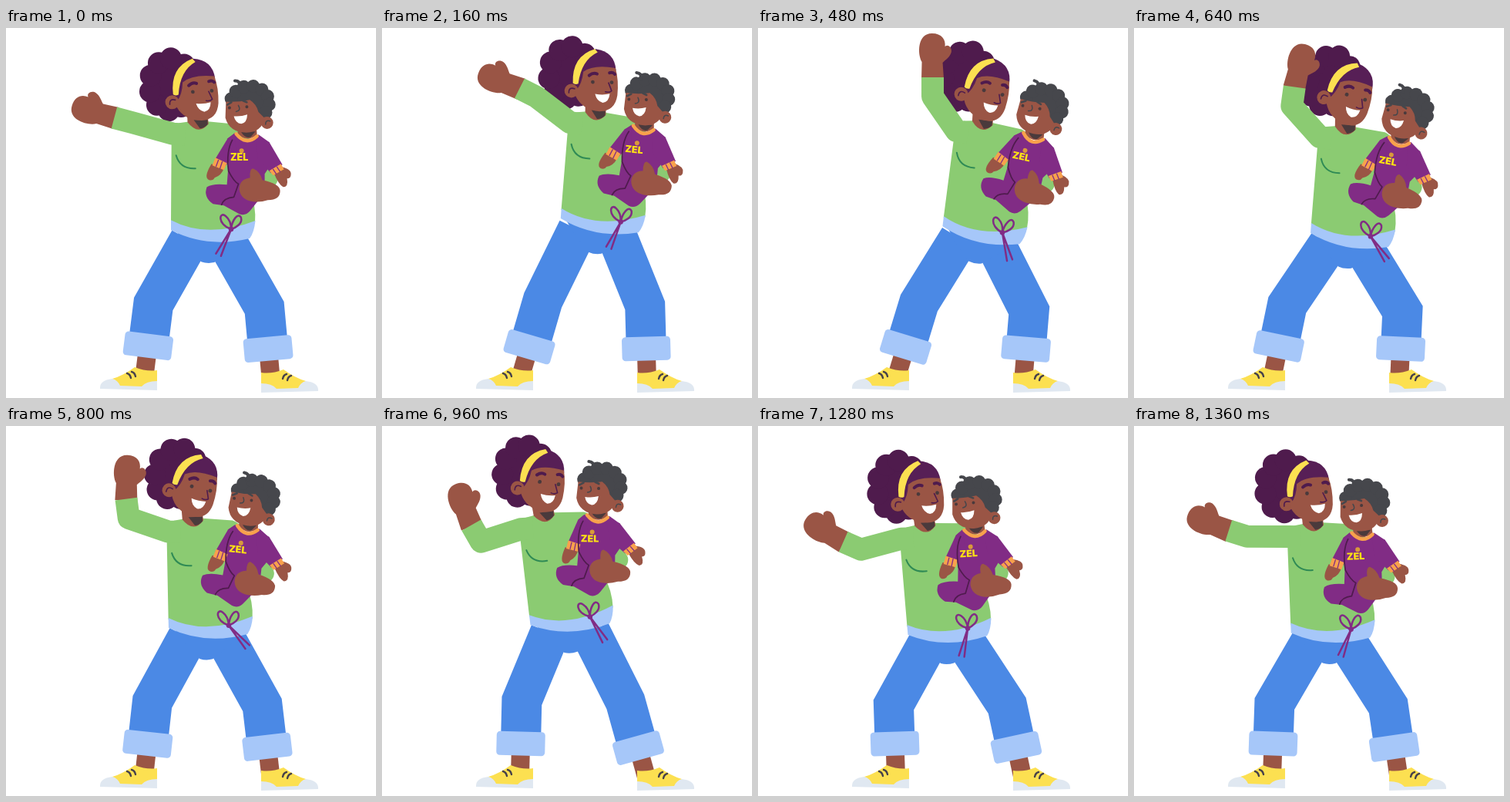
An HTML page that plays this animation: 480x480 px, repeating every 1440 ms.

```html
<!DOCTYPE html>
<html lang="en">
<head>
<meta charset="utf-8">
<title>Dancing with the baby</title>
<style>
  html, body { margin: 0; width: 100%; height: 100%; overflow: hidden; background: #fff; }
  svg { display: block; width: 100%; height: 100%; }
  .skin { fill: #9a5545; }
  .green { fill: #8bcb72; }
  .blue { fill: #4b89e5; }
  .pale { fill: #a6c7f9; }
  .plum { fill: #812c85; }
  .hair { fill: #4f1b4d; }
  .yellow { fill: #fce051; }
  .curl { fill: #46474c; }
  .shade { fill: #4a3a3c; }
  .cuff { fill: #f8a14c; }
  .line { fill: none; stroke-linecap: round; stroke-linejoin: round; }
  .sleeve { fill: none; stroke: #8bcb72; stroke-width: 29; stroke-linejoin: round; }
  .leg { fill: none; stroke: #4b89e5; stroke-width: 52; stroke-linejoin: miter; }
  .ankle { stroke: #9a5545; stroke-width: 24; }
  .tag { font: 900 12.5px Inter, Roboto, sans-serif; fill: #fde114; text-anchor: middle; }
</style>
</head>
<body>
<svg viewBox="0 0 480 480">
  <defs>
    <g id="shoe">
      <path fill="#e0e8f1" d="M122 468Q121 457 138 455L148 459L196 456V470Z"/>
      <path class="yellow" d="M138 455Q152 451 167 440Q182 446 196 444V458Q182 458 176 465L148 464Q145 457 138 455Z"/>
      <path class="line" stroke="#46414a" stroke-width="2.4" d="M157 448Q161 449 162 454M163 446Q167 447 168 452"/>
    </g>
  </defs>

  <g id="bun" class="hair"></g>
  <path id="ankleL" class="ankle"/>
  <path id="ankleR" class="ankle"/>
  <path id="legL" class="leg"/>
  <path id="legR" class="leg"/>
  <rect id="cuffL" class="pale" x="-31.5" y="-15.5" width="63" height="31" rx="4.5"/>
  <rect id="cuffR" class="pale" x="-31.5" y="-15.5" width="63" height="31" rx="4.5"/>
  <use href="#shoe"/>
  <use href="#shoe" transform="translate(527 3) scale(-1 1)"/>

  <g id="torso">
    <path class="blue" d="M216 256L235 283L254 304Q262 307 271 305L293 289L317 262Z"/>
    <path class="green" d="M215 252L216 152L226 124L240 122L263 122L302 126Q319 132 320 160L317 210Q326 232 324 254Q262 276 215 252Z"/>
    <path class="pale" d="M215 250Q262 275 324.500 251Q323 266 317 274Q262 287 215 263Z"/>
    <path class="line" stroke="#2f8a55" stroke-width="2" d="M222 166Q227 184 247 183"/>
    <path class="skin" d="M236 105L237 123Q251 141 264 125L263 108Z"/>
    <path class="shade" d="M245 120H263L263 126Q258 131 253 131Z"/>
    <g class="line" stroke="#812c85" stroke-width="2.5">
      <path d="M293 262C274 255 278 238 286 245C292 250 293 257 293 262C294 251 302 239 306 247C308 255 299 260 293 262"/>
      <path id="tails" d="M293 262L289.400 299M293 262L296.600 299"/>
      <circle cx="293" cy="262" r="2" fill="#812c85"/>
    </g>
  </g>

  <path id="hand" class="skin" d="M-14.500 2L-14 -20C-20 -30 -20 -57 -1 -57C12 -57 17 -49 16 -40C20 -44 26 -38 24 -32C22 -26 17 -23 13 -19L14.500 2Z"/>
  <path id="arm" class="sleeve"/>

  <g id="head">
    <path fill="#571f56" d="M222 92Q218 60 243 41Q268 42 272 66L262 78L228 96Z"/>
    <circle class="skin" cx="217" cy="98" r="9"/>
    <path class="skin" d="M223 97Q230 88 230 72Q242 61 271 63Q277 78 277 98Q276 119 256 121Q233 121 223 104Z"/>
    <path class="yellow" d="M218 88Q213 53 242 41L246 45Q226 57 225 88Q221 90 218 88Z"/>
    <g class="line" stroke="#4f1b4d">
      <path stroke-width="1.6" d="M221 95Q213 93 214 101M264 83L269 93Q266 96 261 95"/>
      <path stroke-width="4" d="M238 76Q243 71 248 73M264 70Q268 68 271 71"/>
    </g>
    <circle class="shade" cx="243.500" cy="84" r="2.400"/>
    <circle class="shade" cx="268" cy="82" r="2.400"/>
    <path fill="#fff" d="M248 99Q258 100 267 97Q267 108 259 109.500Q251 108 248 99Z"/>
  </g>

  <g id="baby">
    <path class="line" stroke="#8bcb72" stroke-width="24" d="M318 158L342 196"/>
    <path class="plum" d="M298 137Q313 154 329 139L343 149L347 175L337 190V214L318 238Q312 245 304 242L284 231L270 229Q257 220 262 207Q270 202 288 204L290 178L289 144Z"/>
    <g id="armL">
      <path class="skin" d="M268 177Q257 195 265 198Q270 199 272 195Q281 192 284 183Z"/>
      <path class="plum" d="M298 138L289 144L272 172L286 180L300 162Z"/>
      <path class="cuff" d="M273 169L288 176L284 185L269 179Z"/>
      <path class="line" stroke="#812c85" stroke-width="1.300" d="M277 172L274 180M282 174L279 183"/>
    </g>
    <g id="armR">
      <path class="skin" d="M349 189L359 181Q372 184 371 191Q371 196 366 196Q368 207 361 207Q355 204 349 189Z"/>
      <path class="plum" d="M326 141L343 149L360 178L345 189L328 170Z"/>
      <path class="cuff" d="M343 186L358 177L362 184L348 192Z"/>
      <path class="line" stroke="#812c85" stroke-width="1.300" d="M348 184L352 190M353 181L357 187"/>
    </g>
    <path class="line" stroke="#4f1b4d" stroke-width="1.700" d="M295 146Q287 160 290 186Q297 200 303 203L297 220Q284 221 281 230"/>
    <path class="skin" d="M302 128L302 138Q314 150 327 139L326 126Z"/>
    <path class="shade" d="M306 135H325L319 142Q312 145 306 135Z"/>
    <path class="line" stroke="#f8a14c" stroke-width="4.500" d="M300 138Q313 154 327 141"/>
    <circle cx="307" cy="160" r="3" fill="#d99a3a"/>
    <text class="tag" x="304" y="173">ZEL</text>
    <path class="skin" d="M304 210Q304 197 318 195Q317 183 322 183Q331 187 334 198Q357 203 357 212Q357 224 341 224Q332 227 322 226Q306 224 304 210Z"/>
    <g id="babyHead">
      <g id="curls" class="curl"></g>
      <path class="line" stroke="#46474c" stroke-width="4" d="M306 77Q306 69 299 69"/>
      <circle class="skin" cx="340" cy="124" r="8"/>
      <path class="skin" d="M287 96Q302 97 318 94Q327 100 329 110L337 118Q333 136 313 136.500Q291 136 286 117Z"/>
      <path class="line" stroke="#46474c" stroke-width="1.500" d="M344 122Q338 120 338 126M303 101Q307 108 300 109"/>
      <path class="line" stroke="#46474c" stroke-width="2.600" d="M289 100L294 97M309 95L314 97"/>
      <circle class="shade" cx="291.500" cy="104" r="2"/>
      <circle class="shade" cx="314" cy="103" r="2"/>
      <path fill="#fff" d="M297 115Q306 116 314.500 113Q314 124 306.500 125Q299 124 297 115Z"/>
    </g>
  </g>
</svg>
<script>
const LOOP = 1440, STEP = 80;
const $ = id => document.getElementById(id);
const rad = a => a * Math.PI / 180;
const set = (id, name, value) => $(id).setAttribute(name, value);
const move = (id, value) => set(id, 'transform', value);
const poly = (...pts) => 'M' + pts.map(p => p.map(v => v.toFixed(2)).join(' ')).join('L');
const polar = ([x, y], a, r) => [x - r * Math.cos(rad(a)), y - r * Math.sin(rad(a))];
const toward = ([x, y], [u, v], r) => {
  const k = r / Math.hypot(u - x, v - y);
  return [x + (u - x) * k, y + (v - y) * k];
};

// Sway once per loop (c, s) plus a bounce twice per loop (c2, s2)
const wave = (mid, c, s, c2 = 0, s2 = 0) => p =>
  mid + c * Math.cos(p) + s * Math.sin(p) + c2 * Math.cos(2 * p) + s2 * Math.sin(2 * p);

const bodyX = wave(215.3, -3.5, 29.6, 2.2, 0.7);
const bodyY = wave(246.3, -1.4, -7.7, 4.4, -7.1);
const lean = wave(-0.2, -0.8, 7.8, 0.8, -0.3);
const headTilt = wave(10.6, -9.4, 3.6);
const bunShift = wave(3, -2, -3.5);
const tailSwing = wave(-6.7, 33, 9.6);
const babyX = wave(89.3, -3.5, 12.1, 2.8, -0.6);
const babyY = wave(-85.7, 1.3, 12.5, 3.4);
const babyTilt = wave(4.3, -4.3, 6.8);
const babyNod = wave(5.3, -6, 5.2);
const babyArms = wave(-3, 3, 4);

// Arm angles: 0 points left, 90 points up
const upperArm = wave(17.7, -10.3, 41.7, 8.1, -0.5);
const foreArm = wave(55, -38.6, 11.4, -1.4, -5.9);
const handTurn = wave(59, -42.3, 4, 0, -7.5);

// Curly hair: an ellipse with bumps along its rim
function curls(id, cx, cy, rx, ry, r, from, to, n) {
  let out = `<ellipse cx="${cx}" cy="${cy}" rx="${rx}" ry="${ry}"/>`;
  for (let i = 0; i < n; i++) {
    const a = rad(from + (to - from) * i / (n - 1));
    out += `<circle cx="${cx + rx * Math.cos(a)}" cy="${cy + ry * Math.sin(a)}" r="${r}"/>`;
  }
  $(id).innerHTML = out;
}
curls('bun', 213, 75, 27, 34, 14, -50, 270, 10);
curls('curls', 318, 98, 25, 22, 8.5, -165, 35, 8);

// The knee bows outward more as hip and foot come closer
function poseLeg(side, foot, hip) {
  const dx = hip[0] - foot[0], dy = hip[1] - foot[1], d = Math.hypot(dx, dy);
  const bow = (108.5 / d - 0.5) * (side === 'L' ? 1 : -1);
  const knee = [foot[0] + 0.53 * dx + bow * dy, foot[1] + 0.53 * dy - bow * dx];
  const cuff = toward(foot, knee, 43);
  const turn = Math.atan2(knee[0] - foot[0], foot[1] - knee[1]) * 180 / Math.PI;
  set('leg' + side, 'd', poly(toward(hip, knee, -8), knee, cuff));
  set('ankle' + side, 'd', poly(foot, cuff));
  move('cuff' + side, `translate(${cuff}) rotate(${turn})`);
}

function draw(t) {
  const p = 2 * Math.PI * t / LOOP;
  const px = bodyX(p), py = bodyY(p), a = lean(p);
  const c = Math.cos(rad(a)), s = Math.sin(rad(a));
  const at = (x, y) => [px + (x - 215) * c - (y - 250) * s, py + (x - 215) * s + (y - 250) * c];

  const body = `translate(${px} ${py}) rotate(${a}) translate(-215 -250)`;
  const head = `${body} rotate(${headTilt(p) - a} 258 102)`;
  move('torso', body);
  move('head', head);
  move('bun', `${head} translate(${bunShift(p)} 0)`);
  move('tails', `rotate(${tailSwing(p) - a} 293 262)`);

  poseLeg('L', [179, 455], at(235, 283));
  poseLeg('R', [344, 459], at(293.5, 289));

  const shoulder = at(218, 138);
  const elbow = polar(shoulder, upperArm(p), 54);
  const wrist = polar(elbow, foreArm(p), 25);
  set('arm', 'd', poly(at(234, 139), shoulder, elbow, wrist));
  move('hand', `translate(${wrist}) rotate(${handTurn(p) - 90})`);

  const tilt = babyTilt(p);
  move('baby', `translate(${px + babyX(p)} ${py + babyY(p)}) rotate(${tilt}) translate(-304 -169)`);
  move('babyHead', `rotate(${babyNod(p) - tilt} 306 118)`);
  move('armL', `rotate(${babyArms(p)} 292 148)`);
  move('armR', `rotate(${babyArms(p)} 336 152)`);
}

const start = performance.now();
function tick() {
  const t = (performance.now() - start) % LOOP;
  draw(Math.floor(t / STEP) * STEP);
  requestAnimationFrame(tick);
}
draw(0);
requestAnimationFrame(tick);
</script>
</body>
</html>
```
